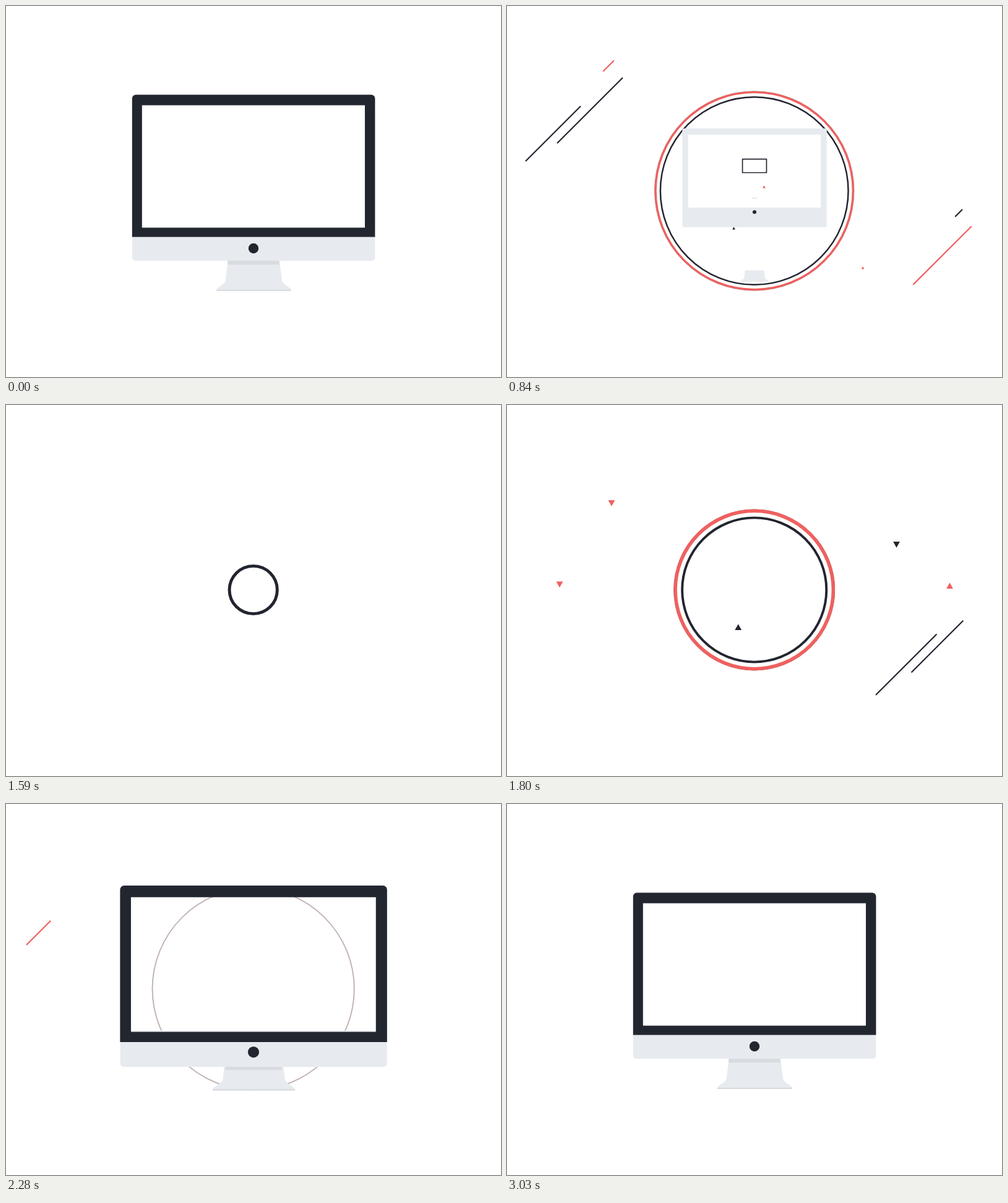
An HTML page with a canvas that plays this animation: 800 by 600 pixels, repeating every 3150 ms.

```html
<!DOCTYPE html>
<html lang="en">
<head>
<meta charset="utf-8">
<title>Monitor</title>
<style>
html, body { margin: 0; width: 100%; height: 100%; overflow: hidden; background: #fff; }
canvas { display: block; width: 800px; height: 600px; }
</style>
</head>
<body>
<canvas id="stage" width="800" height="600"></canvas>
<script>
const ctx = document.getElementById('stage').getContext('2d');
const LOOP = 3150, STEP = 30, TURN = 1455, MIRROR = 2880;
const DARK = '#22272f', LIGHT = '#e7ebf0', SHADE = '#d8dce1', RED = '#f0605f', INK = '#22252f';
const CX = 400, CY = 299;

const clamp = v => Math.min(1, Math.max(0, v));
const backIn = x => x * x * (2.70158 * x - 1.70158);
const circIn = x => 1 - Math.sqrt(1 - x * x);

// 0 = at rest, 1 = gone; outStart leaves, inStart returns
function gone(t, outStart, outTime, inStart, inTime) {
  return t < TURN ? clamp((t - outStart) / outTime) : 1 - clamp((t - inStart) / inTime);
}

function scaled(k, y, draw) {
  if (k < 0.01) return;
  ctx.save();
  ctx.translate(CX, y);
  ctx.scale(k, k);
  ctx.translate(-CX, -y);
  draw();
  ctx.restore();
}

function frame(bottom, bottomRadius, color) {
  ctx.fillStyle = color;
  ctx.beginPath();
  ctx.roundRect(203.8, 143.5, 392.6, bottom - 143.5, [6, 6, bottomRadius, bottomRadius]);
  ctx.rect(219.8, 160.5, 360.2, 198);
  ctx.fill('evenodd');
}

function stand() {
  ctx.fillStyle = LIGHT;
  ctx.beginPath();
  ctx.moveTo(358.5, 412);
  ctx.lineTo(355, 443);
  ctx.bezierCurveTo(354, 451, 342, 454, 340, 459);
  ctx.lineTo(461, 459);
  ctx.bezierCurveTo(459, 454, 447, 451, 446, 443);
  ctx.lineTo(442, 412);
  ctx.fill();
  ctx.fillStyle = SHADE;
  ctx.beginPath();
  ctx.roundRect(339.6, 458.8, 121.6, 2.2, 1);
  ctx.fill();
}

function monitor(t) {
  const size = (outStart, inStart) => 1 - backIn(gone(t, outStart, 530, inStart, 530));
  const bezel = size(322, 1985), small = size(357, 1985), body = size(394, 1955);
  scaled(small, 436.5, stand);
  scaled(bezel, CY, () => {
    ctx.fillStyle = SHADE;
    ctx.fillRect(358.3, 406, 83.4, 12.3);
  });
  scaled(body, 278, () => frame(412, 5, LIGHT));
  scaled(bezel, 258.5, () => frame(373.5, 0, DARK));
  scaled(small, CY, () => {
    ctx.fillStyle = DARK;
    ctx.beginPath();
    ctx.arc(CX, 392, 8.2, 0, 7);
    ctx.fill();
  });
}

function ring(r, width, color, alpha) {
  if (r <= 0 || alpha <= 0) return;
  ctx.globalAlpha = alpha;
  ctx.strokeStyle = color;
  ctx.lineWidth = width;
  ctx.beginPath();
  ctx.arc(CX - 0.3, CY, r, 0, 7);
  ctx.stroke();
  ctx.globalAlpha = 1;
}

function rings(t) {
  const R = 163.3;
  const thin = gone(t, 760, 500, 1625, 444);
  const red = gone(t, 725, 545, 1610, 505);
  const dark = gone(t, 566, 745, 1568, 774);
  if (thin > 0) {
    ring(R * (1 - circIn(thin)), 1, INK, clamp(0.2 + thin * 2.2) * 0.8);
  } else if (t < TURN) {
    ring(R, 1.2, '#d4d4d6', clamp((t - 420) / 60));
  } else {
    ring(R, 1.8, '#d3c0c4', clamp((2500 - t) / 200));
  }
  if (red > 0) ring(R * (1 - circIn(red)), Math.min(5.5, 10 * red ** 0.7), RED, clamp(red * 5));
  if (dark > 0) ring(R * (1 - circIn(dark)), 5 * dark ** 0.7, INK, clamp(dark * 3));
}

// x, y, direction, start of head, delay of tail, colour
const streaks = [
  [30, 251, 1, 663, 182, INK],
  [47, 256, 1, 600, 143, INK],
  [33, 228, 1, 494, 130, RED],
  [736, 329, -1, 790, 180, INK],
  [751, 356, -1, 656, 180, RED],
  [749, 337, -1, 895, 135, INK]
];

function streak(p, [x, y, dir, start, delay, color]) {
  const at = s => dir * 140 * clamp((p - s) / 235) ** 1.6;
  const head = at(start), tail = at(start + delay);
  if (head === tail) return;
  ctx.strokeStyle = color;
  ctx.lineWidth = 2.2;
  ctx.beginPath();
  ctx.moveTo(x + tail, y - tail);
  ctx.lineTo(x + head, y - head);
  ctx.stroke();
}

// x at birth + 40 ms, y, birth, speed, colour
const chips = [
  [415.5, 292.5, 800, 1.25, RED],
  [575, 423.5, 800, 1.92, RED],
  [366.5, 359.5, 800, 0.03, INK],
  [385, 158.5, 860, -1.2, RED],
  [431.5, 225.5, 860, 1.1, INK],
  [229, 290, 860, -0.8, RED]
];

function chip(p, [x, y, birth, speed, color]) {
  const age = p - birth;
  const k = clamp(age / 90) * clamp((1230 - p) / 80);
  if (k <= 0) return;
  ctx.save();
  ctx.translate(x + speed * (age - 40), y);
  ctx.rotate(Math.PI * (age - 40) / 60);
  ctx.scale(k, k);
  ctx.fillStyle = color;
  ctx.beginPath();
  ctx.moveTo(0, -5.2);
  ctx.lineTo(5.4, 4.4);
  ctx.lineTo(-5.4, 4.4);
  ctx.fill();
  ctx.restore();
}

function draw(t) {
  const p = t < TURN ? t : MIRROR - t;
  ctx.fillStyle = '#fff';
  ctx.fillRect(0, 0, 800, 600);
  rings(t);
  streaks.forEach(s => streak(p, s));
  monitor(t);
  chips.forEach(c => chip(p, c));
}

let origin = null;
function tick(now) {
  if (origin === null) origin = now;
  const t = Math.max(0, now - origin) % LOOP;
  draw(Math.floor(t / STEP + 0.001) * STEP);
  requestAnimationFrame(tick);
}
draw(0);
requestAnimationFrame(tick);
</script>
</body>
</html>
```
